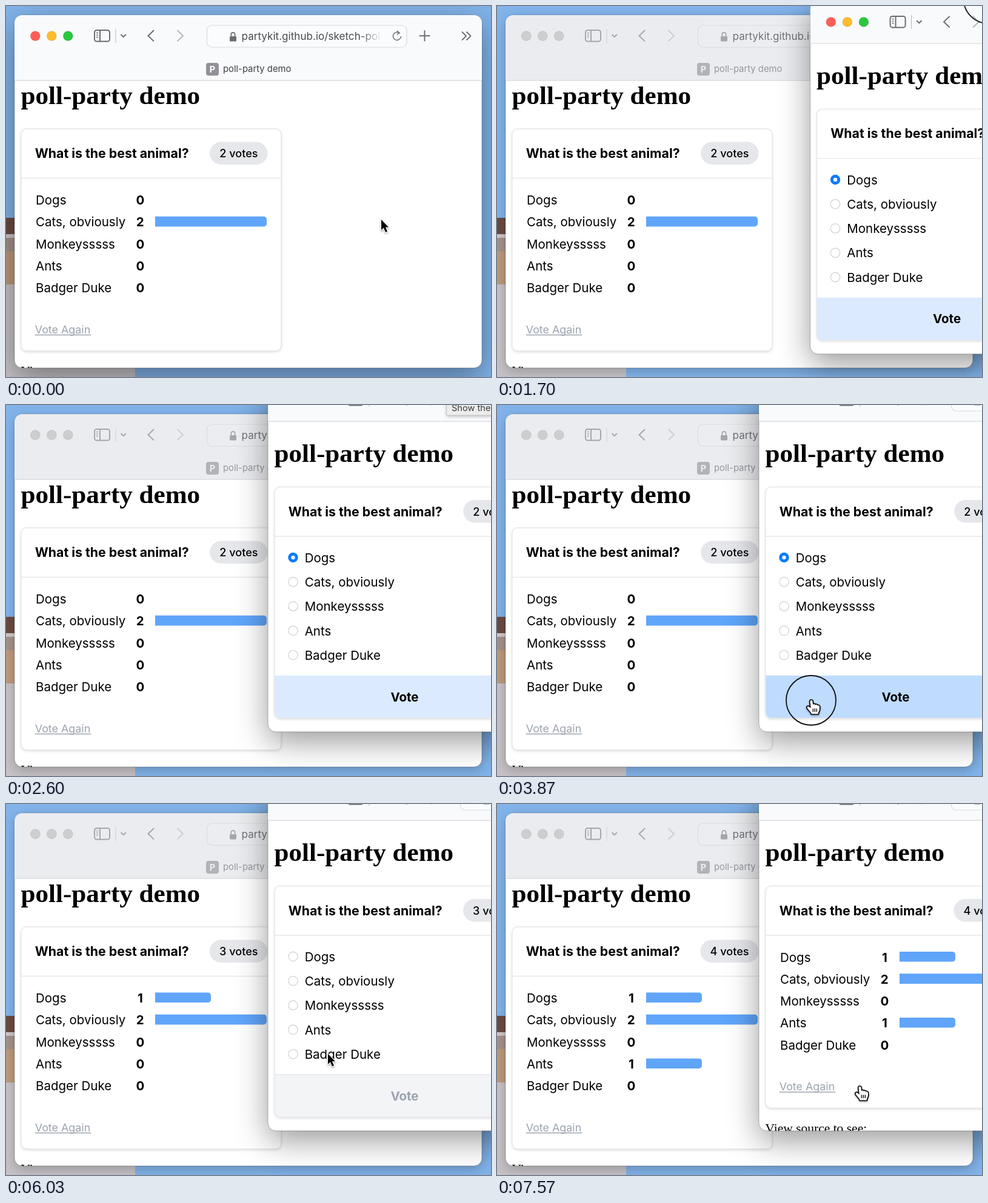
An HTML page with a canvas that plays this animation: 800x613 px, repeating every 8000 ms.

```html
<!DOCTYPE html>
<html lang="en">
<head>
<meta charset="utf-8">
<title>poll-party demo</title>
<style>
  html, body { margin: 0; width: 800px; height: 613px; overflow: hidden; }
  canvas { display: block; }
</style>
</head>
<body>
<canvas id="stage" width="800" height="613"></canvas>
<script>
const ctx = document.getElementById('stage').getContext('2d');
const LOOP = 8000;
const SANS = 'Inter, sans-serif', SERIF = '"Liberation Serif", serif';
const BODY = `20.5px ${SANS}`, BOLD = `700 20.5px ${SANS}`;
const OPTIONS = ['Dogs', 'Cats, obviously', 'Monkeysssss', 'Ants', 'Badger Duke'];

// Times of the events, in ms
const FOCUS = 1300, DROP = 2400, FIRST_VOTE = 4000, VOTE_AGAIN = 5800, PICK_ANTS = 6420, SECOND_VOTE = 7380;
const CLICKS = [[FOCUS, DROP], [3870, 3980], [5690, 5790], [6330, 6450], [7170, 7290]];

// Keys are [time, x, y]
const WINDOW_PATH = [[1300, 880, 75], [1470, 604, 23], [2000, 458, -32], [2380, 432, -43]];
const POINTER_PATH = [
  [30, 619, 353], [150, 690, 285], [290, 850, 130], [2600, 726, -47], [3370, 519, 484], [3430, 518, 488],
  [5500, 518, 488], [5680, 515, 469], [5800, 515, 469], [6030, 531, 413], [6300, 533, 375],
  [6500, 533, 375], [7130, 598, 467]
];

// Smooth interpolation that never overshoots and rests on plateaus
function glide(keys, t, axis) {
  const last = keys.length - 1;
  if (t <= keys[0][0]) return keys[0][axis];
  if (t >= keys[last][0]) return keys[last][axis];
  const i = keys.findIndex(k => k[0] > t) - 1;
  const slope = j => j < 0 || j >= last ? 0 : (keys[j + 1][axis] - keys[j][axis]) / (keys[j + 1][0] - keys[j][0]);
  const tangent = j => {
    const a = slope(j - 1), b = slope(j);
    return a * b > 0 ? 2 * a * b / (a + b) : 0;
  };
  const span = keys[i + 1][0] - keys[i][0], u = (t - keys[i][0]) / span, v = 1 - u;
  return keys[i][axis] * (1 + 2 * u) * v * v + keys[i + 1][axis] * u * u * (3 - 2 * u)
    + span * (tangent(i) * u * v * v - tangent(i + 1) * u * u * v);
}

const grow = (t, start) => {
  const u = Math.min(1, Math.max(0, (t - start) / 150));
  return u * u * (3 - 2 * u);
};

function box(x, y, w, h, radius, fill, stroke, lineWidth = 1) {
  ctx.beginPath();
  ctx.roundRect(x, y, w, h, radius);
  if (fill) { ctx.fillStyle = fill; ctx.fill(); }
  if (stroke) { ctx.strokeStyle = stroke; ctx.lineWidth = lineWidth; ctx.stroke(); }
}

function disc(x, y, r, fill, stroke, lineWidth = 1) {
  box(x - r, y - r, 2 * r, 2 * r, r, fill, stroke, lineWidth);
}

function text(string, x, y, font, color, align = 'left') {
  ctx.font = font;
  ctx.fillStyle = color;
  ctx.textAlign = align;
  ctx.fillText(string, x, y);
}

function line(path, color, width = 2) {
  ctx.strokeStyle = color;
  ctx.lineWidth = width;
  ctx.stroke(new Path2D(path));
}

function shadow(color, blur, y) {
  ctx.shadowColor = color;
  ctx.shadowBlur = blur;
  ctx.shadowOffsetY = y;
}

function desktop() {
  const band = (x, y, w, h, color) => box(x, y, w, h, 0, color);
  band(0, 0, 800, 613, '#82b4eb');
  band(0, 350, 14, 27, '#6a4b43');
  band(0, 377, 14, 6, '#cfc8c8');
  band(0, 383, 14, 22, '#a5928a');
  band(0, 405, 14, 55, '#bd9a7c');
  band(0, 460, 213, 153, '#c6c2c6');
}

function toolbar(active, hasTab) {
  const icon = active ? '#6c6d70' : '#a6a7aa';
  const faint = active ? '#b4b5b8' : '#cdced1';
  const lights = active ? ['#ff5d55', '#febb2e', '#29c740'] : ['#cdced0', '#cdced0', '#cdced0'];
  const height = hasTab ? 108 : 70;
  box(0, 0, 771, height, 0, active ? '#f9fafc' : '#ebecef');
  line(`M0 ${height}H771`, '#dcdde0', 1.3);
  lights.forEach((color, i) => disc(34.3 + 27 * i, 34.5, 8, color, 'rgba(0,0,0,.08)'));

  box(132, 25, 25, 18.5, 3.5, null, icon, 2);
  line('M141 25V43.5', icon);
  line('M135 29.5h3M135 33h3M135 36.5h3', icon, 1.5);
  line('M167 23V46', faint, 1);
  line('M175.5 32l4.2 4.2 4.2-4.2', icon);
  line('M230 25l-9.5 9.2 9.5 9.2', icon);
  line('M268.5 25l9.5 9.2-9.5 9.2', faint);
  box(317.5, 17, 329.5, 36, 8, active ? '#fbfcfd' : '#ecedf0', '#dadbde', 1.2);
  box(355, 35, 11, 8.5, 1.5, icon);
  line('M357.3 35v-3a3.2 3.2 0 0 1 6.4 0v3', icon, 1.7);
  line('M636 30.5a6.6 6.6 0 1 0 1.6 4.5M631 26l3.5 3-3.5 3.4', icon, 1.5);
  line('M667.5 34.3h18M676.5 25.3v18', icon);
  line('M738 27.5l7 7-7 7M745.5 27.5l7 7-7 7', icon, 1.8);

  const fade = ctx.createLinearGradient(570, 0, 606, 0);
  const ink = active ? '74,75,78' : '112,113,116';
  fade.addColorStop(0, `rgb(${ink})`);
  fade.addColorStop(1, `rgba(${ink},0)`);
  text('partykit.github.io/sketch-poll', 374.5, 41.3, `17.1px ${SANS}`, fade);

  if (hasTab) {
    box(316, 79, 21, 21, 4, active ? '#919197' : '#b2b3b7');
    text('P', 326.5, 94.8, `700 14.5px ${SANS}`, active ? '#fff' : '#eeeff1', 'center');
    text('poll-party demo', 344, 94.3, `14.8px ${SANS}`, active ? '#3e3f42' : '#96979a');
  }
}

function results(votes, bars) {
  OPTIONS.forEach((option, i) => {
    const y = 117.3 + 36.3 * i;
    text(option, 24, y + 7.7, BODY, '#000');
    text(votes[i], 196.3, y + 7.7, BOLD, '#000', 'center');
    if (bars[i] > 0) box(221, y - 8.8, 92 * bars[i], 16.6, [0, 5, 5, 0], '#60a5fa');
  });
  text('Vote Again', 22.7, 337.5, `17.9px ${SANS}`, '#9ca3af');
  line('M22.7 340.5h92.5', '#9ca3af', 1.3);
}

function ballot(selected, hover) {
  OPTIONS.forEach((option, i) => {
    const y = 116.5 + 40.3 * i;
    if (i === selected) {
      disc(30.5, y, 8.2, '#0a7aff');
      disc(30.5, y, 3.2, '#fff');
    } else {
      disc(30.5, y, 7.7, '#fff', '#d0d0d2', 1.2);
    }
    text(option, 49.7, y + 7.6, BODY, '#000');
  });
  const enabled = selected >= 0;
  box(0, 311.5, 429, 70, [0, 0, 9, 9], hover ? '#bfdbfe' : enabled ? '#dbeafe' : '#f3f4f6');
  if (!enabled) line('M0 311.5h429', '#e5e7eb', 1.3);
  text('Vote', 214.5, 354, BOLD, enabled ? '#000' : '#9ca3af', 'center');
}

// Draws heading, card and footer with the card's corner at the origin
function page(poll, showResults) {
  const height = showResults ? 367 : 382;
  text('poll-party demo', -0.5, -41.2, `700 43.1px ${SERIF}`, '#000');
  shadow('rgba(0,0,0,.16)', 4, 1.5);
  box(0, 0, 429, height, 9, '#fff');
  shadow('transparent', 0, 0);

  text('What is the best animal?', 22.7, 48, `700 21.3px ${SANS}`, '#000');
  const label = `${poll.total} votes`, labelFont = `500 18.1px ${SANS}`;
  ctx.font = labelFont;
  const pill = ctx.measureText(label).width + 32;
  box(406.5 - pill, 21.5, pill, 37.5, 19, '#e5e7eb');
  text(label, 406.5 - pill / 2, 47, labelFont, '#000', 'center');
  line('M0 81.5h429', '#e5e7eb', 1.3);

  if (showResults) results(poll.votes, poll.bars);
  else ballot(poll.selected, poll.hover);
  box(0, 0, 429, height, 9, null, '#e5e7eb', 1.3);
  text('View source to see:', -0.5, height + 40, `21.5px ${SERIF}`, '#000');
}

function browser(x, y, active, hasTab, poll, showResults) {
  ctx.save();
  ctx.translate(x, y);
  if (active) shadow('rgba(0,0,0,.4)', 52, 16);
  else shadow('rgba(0,0,0,.22)', 20, 6);
  box(0, 0, 771, 583, 13, '#fff');
  shadow('transparent', 0, 0);
  box(0, 0, 771, 583, 13, null, 'rgba(0,0,0,.28)');
  ctx.clip();
  toolbar(active, hasTab);
  ctx.translate(11, hasTab ? 188 : 178.5);
  page(poll, showResults);
  ctx.restore();
}

function tooltip() {
  shadow('rgba(0,0,0,.25)', 5, 2);
  box(726.5, -12, 140, 29, 2, '#ededee');
  shadow('transparent', 0, 0);
  box(726.5, -12, 140, 29, 2, null, '#c3c3c5');
  text('Show the sidebar', 735, 9.5, `14.6px ${SANS}`, '#3a3a3c');
}

const ARROW = new Path2D('M0 0V17.2L3.9 13.6L7 20.8L10 19.5L6.9 12.5H12Z');
const HAND = new Path2D('M-1.6 1.8C-1.4-.8 2.2-.8 2.5 1.8L3.2 7.2C4 5.6 6.6 5.8 7 7.8C8 6.4 10.2 6.9 10.5 8.8'
  + 'C12 7.8 14 8.6 14 10.8V14.5C14 17.5 11.8 18.6 11.8 22.5H.8C.4 19.5-4.2 16-6.3 12.4C-7.2 10.4-5 9.2-3.2 10.6L-.3 13Z');

function pointer(x, y, hand, pressed) {
  ctx.save();
  ctx.translate(x, y);
  ctx.lineJoin = 'round';
  ctx.lineWidth = hand ? 3.2 : 2.4;
  ctx.strokeStyle = hand ? '#000' : '#fff';
  ctx.fillStyle = hand ? '#fff' : '#000';
  shadow('rgba(0,0,0,.35)', 3, 1.5);
  ctx.stroke(hand ? HAND : ARROW);
  shadow('transparent', 0, 0);
  ctx.fill(hand ? HAND : ARROW);
  if (hand) line('M3.3 13.5v5.5M6.3 13.5v5.5M9.3 13.5v5.5', '#000', 1.3);
  if (pressed) disc(0, 0, 41, null, '#111', 1.8);
  ctx.restore();
}

function draw(t) {
  const winX = glide(WINDOW_PATH, t, 1), winY = glide(WINDOW_PATH, t, 2);
  const dragging = t >= FOCUS && t < DROP;
  const x = dragging ? winX + 294 : glide(POINTER_PATH, t, 1);
  const y = dragging ? winY - 4 : glide(POINTER_PATH, t, 2);
  const pressed = CLICKS.some(([down, up]) => t >= down && t < up);

  const showResults = (t >= FIRST_VOTE && t < VOTE_AGAIN) || t >= SECOND_VOTE;
  const selected = t < FIRST_VOTE ? 0 : t >= PICK_ANTS ? 3 : -1;
  const dogs = +(t >= FIRST_VOTE), ants = +(t >= SECOND_VOTE);
  const hover = !showResults && selected >= 0 && t > DROP && y > winY + 489;
  const poll = {
    selected, hover, total: 2 + dogs + ants,
    votes: [dogs, 2, 0, ants, 0],
    bars: [grow(t, FIRST_VOTE), 2, 0, grow(t, SECOND_VOTE), 0]
  };

  desktop();
  browser(14, 15, t < FOCUS, true, poll, true);
  if (t >= FOCUS) browser(winX, winY, true, false, poll, showResults);
  if (t >= 2570 && t < 2720) tooltip();
  pointer(x, y, hover || showResults, pressed);
}

function tick() {
  draw(performance.now() % LOOP);
  requestAnimationFrame(tick);
}
tick();
</script>
</body>
</html>
```
